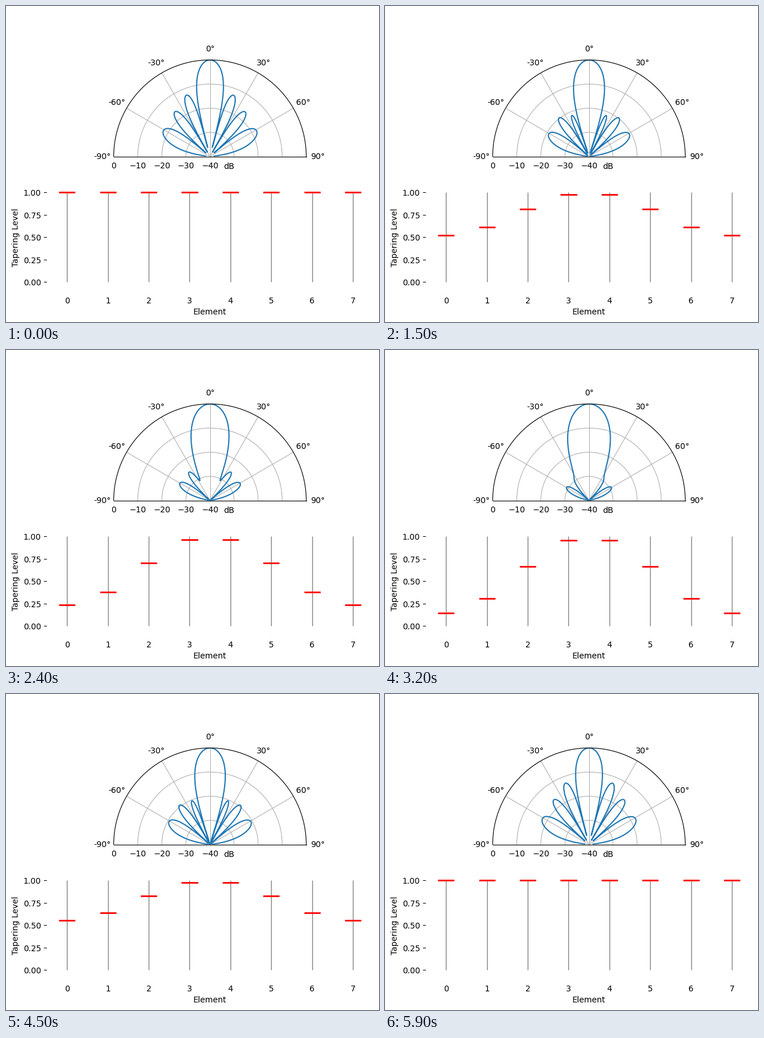
Write a matplotlib script that moves like this. It is 643x543 px and loops after 6 s.

```python
import numpy as np
import matplotlib.pyplot as plt
from matplotlib.animation import FuncAnimation
from matplotlib.transforms import ScaledTranslation

W, H, DPI = 643, 543, 100
N_ELEMENTS, N_FFT = 8, 1024
STEPS = 30
FLOOR_DB = -40
TEXT_DROP = 0.33  # labels sit this many pixels below the line work

plt.rcParams.update({"font.family": "DejaVu Sans", "font.size": 10})
fig = plt.figure(figsize=(W / DPI, H / DPI), dpi=DPI, facecolor="white")


def px_rect(left, top, width, height):
    """Pixel box, measured from the top left, as figure fractions."""
    return [left / W, 1 - (top + height) / H, width / W, height / H]


def lower(labels):
    drop = ScaledTranslation(0, -TEXT_DROP / DPI, fig.dpi_scale_trans)
    for label in labels:
        label.set_transform(label.get_transform() + drop)


def taper(step):
    """Blend from a uniform window to a Hamming window."""
    mix = step / (STEPS - 1)
    return 1 - mix * (1 - np.hamming(N_ELEMENTS))


def pattern_db(weights):
    power = np.abs(np.fft.fftshift(np.fft.fft(weights, N_FFT))) ** 2
    db = 10 * np.log10(np.maximum(power / power.max(), 1e-30))
    return np.where(db >= FLOOR_DB, db, np.nan)


def level_segments(levels):
    return [[(i - 0.2, v), (i + 0.2, v)] for i, v in enumerate(levels)]


# Beam pattern on a half circle
side = 332
polar = fig.add_axes(px_rect(351.6 - side / 2, 10 - TEXT_DROP, side, side),
                     projection="polar")
polar.patch.set_visible(False)
polar.set_theta_zero_location("N")
polar.set_theta_direction(-1)
theta = np.arcsin(np.linspace(-1, 1, N_FFT))
beam, = polar.plot(theta, pattern_db(taper(0)), color="C0", lw=1.5)
polar.set_xticks(np.deg2rad(np.arange(-90, 91, 30)))
polar.set_yticks(np.arange(FLOOR_DB, 1, 10))
polar.set_thetamin(-90)
polar.set_thetamax(90)
polar.set_ylim(FLOOR_DB, 0)
lower(polar.get_xticklabels() + polar.get_yticklabels())
fig.text(384.1 / W, 1 - 280 / H, "dB", ha="center", va="baseline")

# Weight of each element
bars = fig.add_axes(px_rect(70.08, 305, 563.2, 184.8))
bars.patch.set_visible(False)
for spine in bars.spines.values():
    spine.set_visible(False)
bars.vlines(range(N_ELEMENTS), 0, 1, color="gray", lw=1)
marks = bars.hlines(taper(0), np.arange(N_ELEMENTS) - 0.2,
                    np.arange(N_ELEMENTS) + 0.2, color="red", lw=2)
bars.set_xlim(-0.5, N_ELEMENTS - 0.5)
bars.set_ylim(-0.1, 1.1)
bars.set_xticks(range(N_ELEMENTS))
bars.set_yticks(np.linspace(0, 1, 5))
bars.tick_params(axis="x", bottom=False)
bars.set_xlabel("Element")
bars.set_ylabel("Tapering Level")
lower(bars.get_xticklabels() + bars.get_yticklabels() + [bars.yaxis.label])


def update(frame):
    step = min(frame, 2 * STEPS - 1 - frame)
    weights = taper(step)
    beam.set_ydata(pattern_db(weights))
    marks.set_segments(level_segments(weights))
    return beam, marks


anim = FuncAnimation(fig, update, frames=2 * STEPS, interval=100,
                     repeat=True, repeat_delay=0, blit=False)
plt.show()
```
